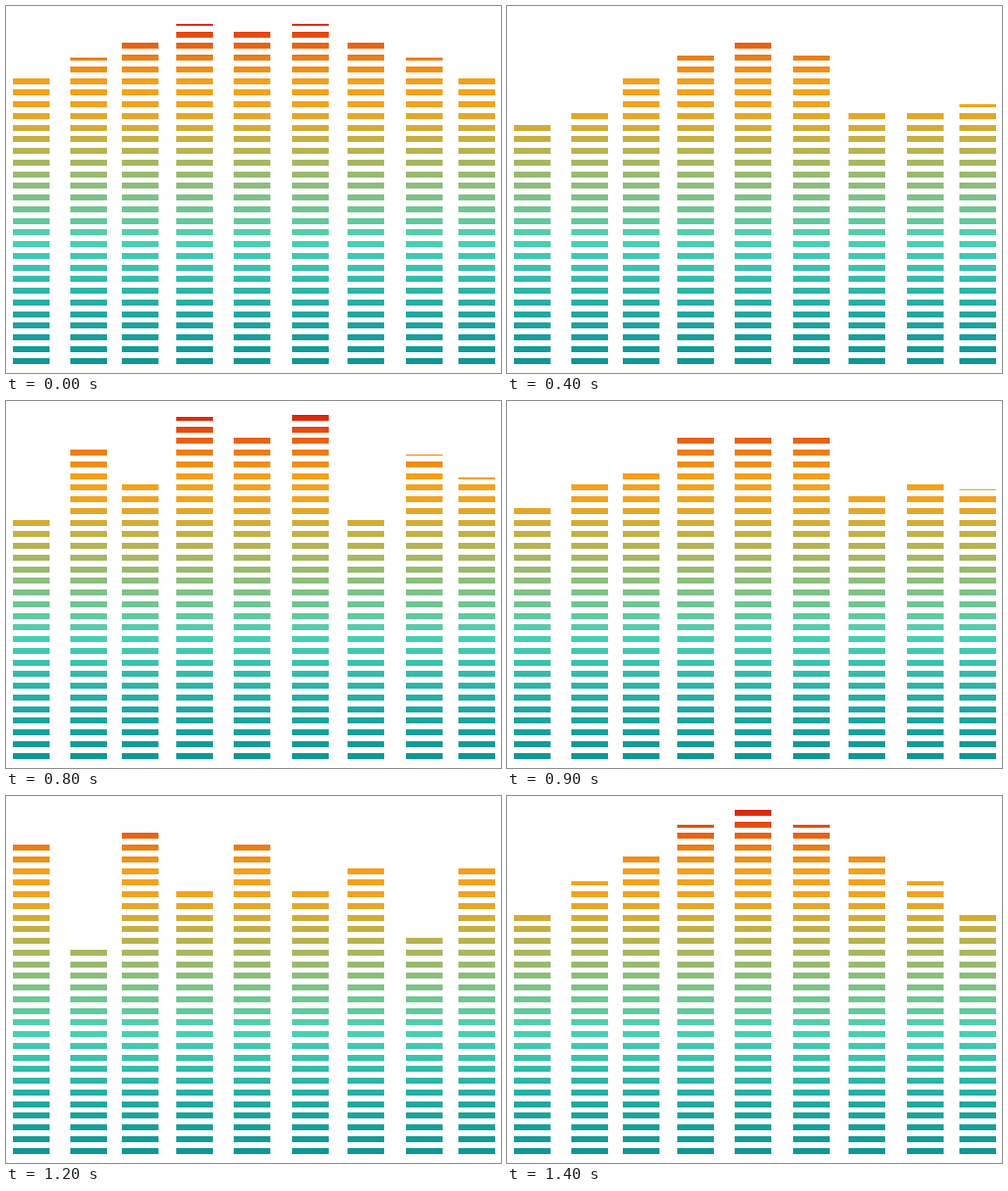
Recreate the animation shown at these times as an HTML page with a canvas. Size 500 by 370 pixels, loop 1.5 s.

```html
<!DOCTYPE html>
<html lang="en">
<head>
<meta charset="utf-8">
<title>Equalizer</title>
<style>
  html, body { margin: 0; width: 100%; height: 100%; overflow: hidden; background: #fff; }
  canvas { display: block; }
</style>
</head>
<body>
<canvas id="stage" width="500" height="370"></canvas>
<script>
const ctx = document.getElementById('stage').getContext('2d');
const LOOP = 1500, STEP = 100;
const ROWS = 30, TOP = 14.25, PITCH = 11.755, BAR_W = 37, BAR_H = 6;
const columns = [7, 65, 117, 172, 230, 289, 345, 404, 457];

// An arch is given by its left half and centre
const arch = (...half) => [...half, ...half.slice(0, -1).reverse()];
const plateau = [96, 108, 50, 50, 26, 50, 63, 108, 100];

// Key poses: time in ms and the top edge of each column
const opening = arch(73, 52, 37, 18, 26);
const poses = [
  [0, opening],
  [200, plateau],
  [600, [131, 99, 89, 49, 37, 49, 143, 101, 98]],
  [800, [120, 49, 84, 16, 37, 14, 120, 54, 77]],
  [1000, plateau],
  [1200, [49, 155, 37, 96, 49, 96, 73, 143, 73]],
  [1400, arch(120, 86, 61, 29, 14)],
  [LOOP, opening]
];

const paint = ctx.createLinearGradient(0, 0, 0, 370);
[
  [14, '#d9220c'], [29, '#e74a0e'], [52, '#ea7f16'], [76, '#f5a11b'], [102, '#f0a41f'],
  [134, '#c4b044'], [181, '#8cbe7c'], [240, '#46d0b4'], [311, '#20a8a0'], [361, '#0e9696']
].forEach(([y, color]) => paint.addColorStop(y / 370, color));

function topsAt(time) {
  const next = poses.findIndex(([at]) => at > time);
  const [start, from] = poses[next - 1];
  const [end, to] = poses[next];
  const k = (time - start) / (end - start);
  return from.map((y, c) => Math.round(y + (to[c] - y) * k));
}

function draw(time) {
  ctx.fillStyle = '#fff';
  ctx.fillRect(0, 0, 500, 370);
  ctx.fillStyle = paint;
  topsAt(time).forEach((top, c) => {
    for (let r = 0; r < ROWS; r++) {
      const y = Math.floor(TOP + r * PITCH);
      const cut = Math.max(y, top);
      if (cut < y + BAR_H) ctx.fillRect(columns[c], cut, BAR_W, y + BAR_H - cut);
    }
  });
}

const begin = performance.now();
function tick() {
  const time = (performance.now() - begin) % LOOP;
  draw(Math.floor(time / STEP) * STEP);
  requestAnimationFrame(tick);
}
tick();
</script>
</body>
</html>
```
